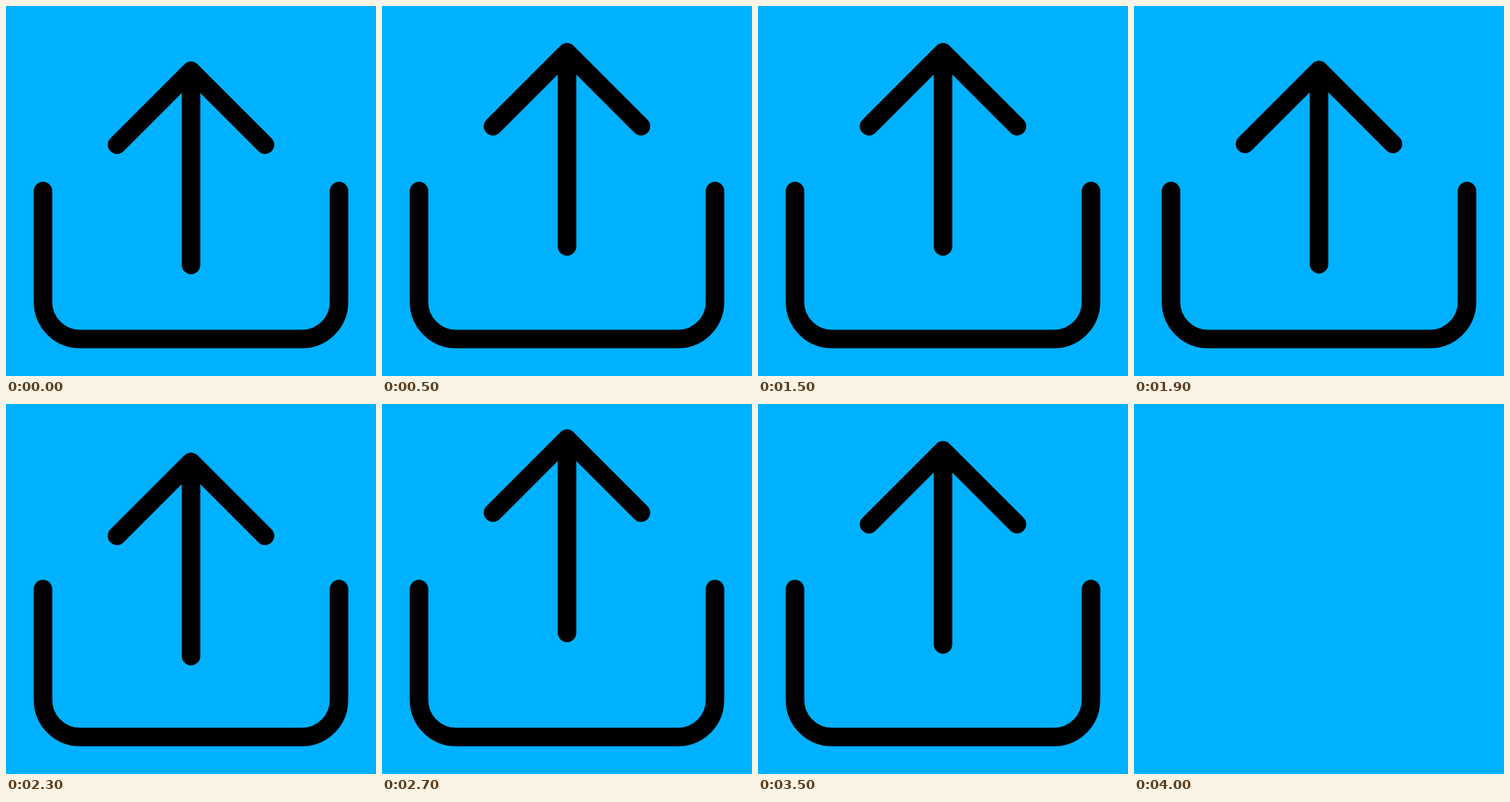
Animation of 500x500 px, one loop 4100 ms. Source, as an HTML page:

```html
<!DOCTYPE html>
<html lang="en">
<head>
<meta charset="utf-8">
<title>Upload icon</title>
<style>
  html, body { margin: 0; height: 100%; overflow: hidden; background: #00b1ff; }
  svg { display: block; width: 100%; height: 100%; }
  path { fill: none; stroke: #000; stroke-width: 25; stroke-linecap: round; stroke-linejoin: round; }
</style>
</head>
<body>
<svg viewBox="0 0 500 500">
  <g id="icon">
    <path d="M50 250V400A50 50 0 0 0 100 450H400A50 50 0 0 0 450 400V250"/>
    <path id="arrow" d="M150 187.5L250 87.5L350 187.5M250 87.5V350"/>
  </g>
</svg>
<script>
  const LOOP = 4100, VISIBLE = 4000, STEP = 100, SWING = 1000, LIFT = 50;
  const icon = document.getElementById('icon');
  const arrow = document.getElementById('arrow');

  // cubic-bezier(.42, 0, .58, 1), solved by bisection
  function easeInOut(x) {
    let low = 0, high = 1, s = 0.5;
    for (let i = 0; i < 24; i++) {
      s = (low + high) / 2;
      const r = 1 - s;
      if (3 * r * r * s * 0.42 + 3 * r * s * s * 0.58 + s ** 3 < x) low = s;
      else high = s;
    }
    return s * s * (3 - 2 * s);
  }

  function draw(now) {
    const time = Math.floor(now % LOOP / STEP) * STEP;
    const phase = time % (2 * SWING) / SWING;
    const lift = LIFT * easeInOut(1 - Math.abs(1 - phase));
    icon.setAttribute('visibility', time < VISIBLE ? 'visible' : 'hidden');
    arrow.setAttribute('transform', `translate(0 ${-lift.toFixed(3)})`);
  }

  const start = performance.now();
  function tick() {
    draw(performance.now() - start);
    requestAnimationFrame(tick);
  }
  tick();
</script>
</body>
</html>
```
